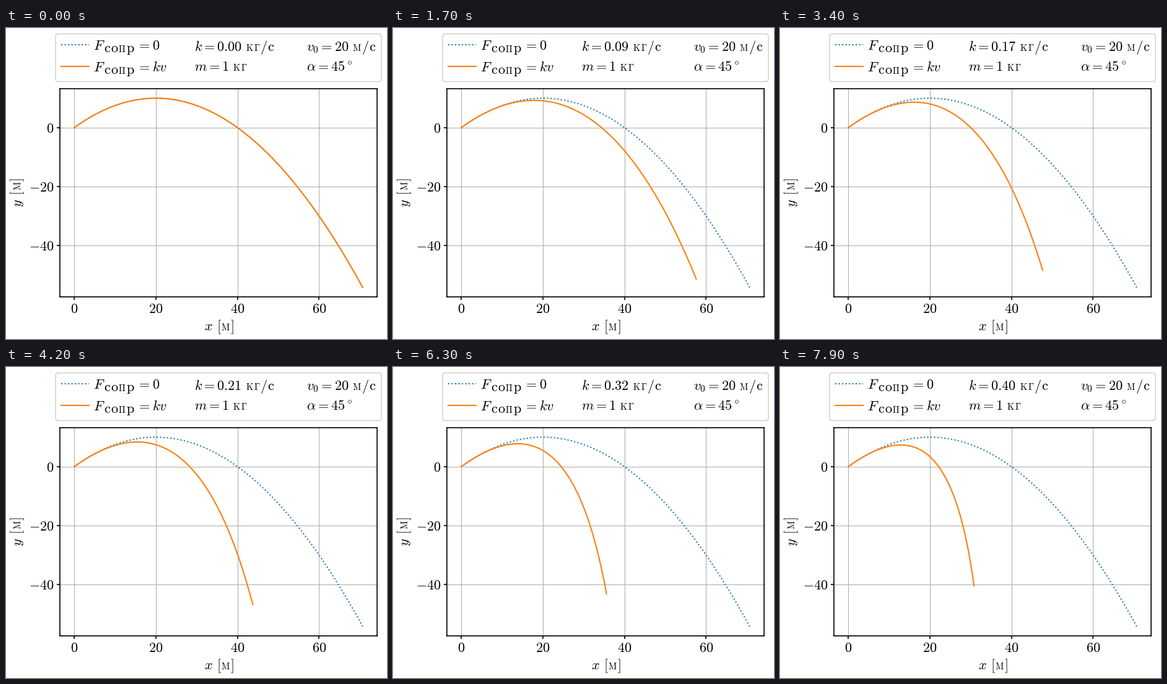
A matplotlib script for the animation above (8000 ms loop, 615 px wide and 502 px high).

```python
import numpy as np
import matplotlib.pyplot as plt
from matplotlib.animation import FuncAnimation
from matplotlib.lines import Line2D
from matplotlib.patches import FancyBboxPatch
from matplotlib.transforms import Affine2D

W, H, DPI = 615, 502, 100
SIZE, SMALL = 16, 10.4
FRAMES, INTERVAL, DK = 80, 100, 0.005
V0, ANGLE, G, M, T_END = 20, np.radians(45), 10, 1, 5

plt.rcParams.update({"mathtext.fontset": "cm", "font.size": SIZE, "axes.linewidth": 1.2})

# The tiny surplus keeps the pixel size from rounding down
fig = plt.figure(figsize=(W / DPI + 1e-6, H / DPI + 1e-6), dpi=DPI)
px = Affine2D().scale(1 / W, -1 / H).translate(0, 1) + fig.transFigure
renderer = fig.canvas.get_renderer()

# Upright Cyrillic letters built from Computer Modern shapes
CYR = {
    "с": (r"\mathrm{c}", SIZE), "о": (r"\mathrm{o}", SIZE), "р": (r"\mathrm{p}", SIZE),
    "к": (r"\mathrm{K}", SMALL), "м": (r"\mathrm{M}", SMALL),
    "п": (r"\Pi", SMALL), "г": (r"\Gamma", SMALL), "/": ("/", SIZE),
}


def put(x, y, tex, size=SIZE, rotation=0):
    """Draw one formula at a baseline point and return it with its length."""
    t = fig.text(x, y, f"${tex}$", size=size, rotation=rotation, transform=px,
                 ha="right" if rotation else "left",
                 va="bottom" if rotation else "baseline")
    box = t.get_window_extent(renderer)
    return t, box.height if rotation else box.width


def word(x, y, letters):
    for ch in letters:
        tex, size = CYR[ch]
        x += put(x, y, tex, size)[1]
    return x


def quantity(x, y, tex, unit=""):
    t, width = put(x, y, tex)
    word(x + width + 6, y, unit)
    return t


def force(x, y, value):
    x += put(x, y, "F")[1] - 2
    x = word(x, y + 4, "сопр")
    put(x + 4, y, "= " + value)


def flight(k):
    t = np.linspace(0, T_END, 200)
    vx, vy = V0 * np.cos(ANGLE), V0 * np.sin(ANGLE)
    if k == 0:
        return vx * t, vy * t - G * t**2 / 2
    tau = M / k
    s = tau * (1 - np.exp(-t / tau))
    return vx * s, (vy + G * tau) * s - G * tau * t


ax = fig.add_axes([87 / W, 1 - 434 / H, 512 / W, 336 / H])
ax.grid(True)
ax.plot(*flight(0), ":", color="C0")
curve, = ax.plot(*flight(0), color="C1")
ax.set_xlim(ax.get_xlim())
ax.set_ylim(ax.get_ylim())
ax.set_xticks([0, 20, 40, 60], [f"${v}$" for v in (0, 20, 40, 60)])
ax.set_yticks([-40, -20, 0], [f"${v}$" for v in (-40, -20, 0)])
ax.tick_params(width=1.2)

# Axis labels
x = 320 + put(320, 488, "x")[1] + 6
x += put(x, 488, "[")[1]
x = word(x, 488, "м")
put(x, 488, "]")

y = 289
for tex, size, right, gap in (("y", SIZE, 31, 6), ("[", SIZE, 32, 0),
                              (r"\mathrm{M}", SMALL, 27, 0), ("]", SIZE, 32, 0)):
    # Each rotated piece hangs above the pen, which climbs the page
    y -= put(right, y, tex, size, 90)[1] + gap

# Legend
fig.add_artist(FancyBboxPatch((80, 9.5), 526, 77, boxstyle="round,pad=0,rounding_size=4.4",
                              fc="white", ec="0.8", lw=1, transform=px))
for y, style, color in ((27, ":", "C0"), (62, "-", "C1")):
    fig.add_artist(Line2D([89, 133.5], [y, y], ls=style, color=color, transform=px))
force(141, 35, "0")
force(141, 70, "kv")
k_text = quantity(304, 37, "k = 0.00", "кг/с")
quantity(304, 69, "m = 1", "кг")
quantity(485, 37, "v_0 = 20", "м/с")
quantity(485, 69, r"\alpha = 45^\circ")


def update(i):
    k = i * DK
    curve.set_data(*flight(k))
    k_text.set_text(f"$k = {k:.2f}$")
    return curve, k_text


anim = FuncAnimation(fig, update, frames=FRAMES, interval=INTERVAL, repeat=True, repeat_delay=0)
plt.show()
```
